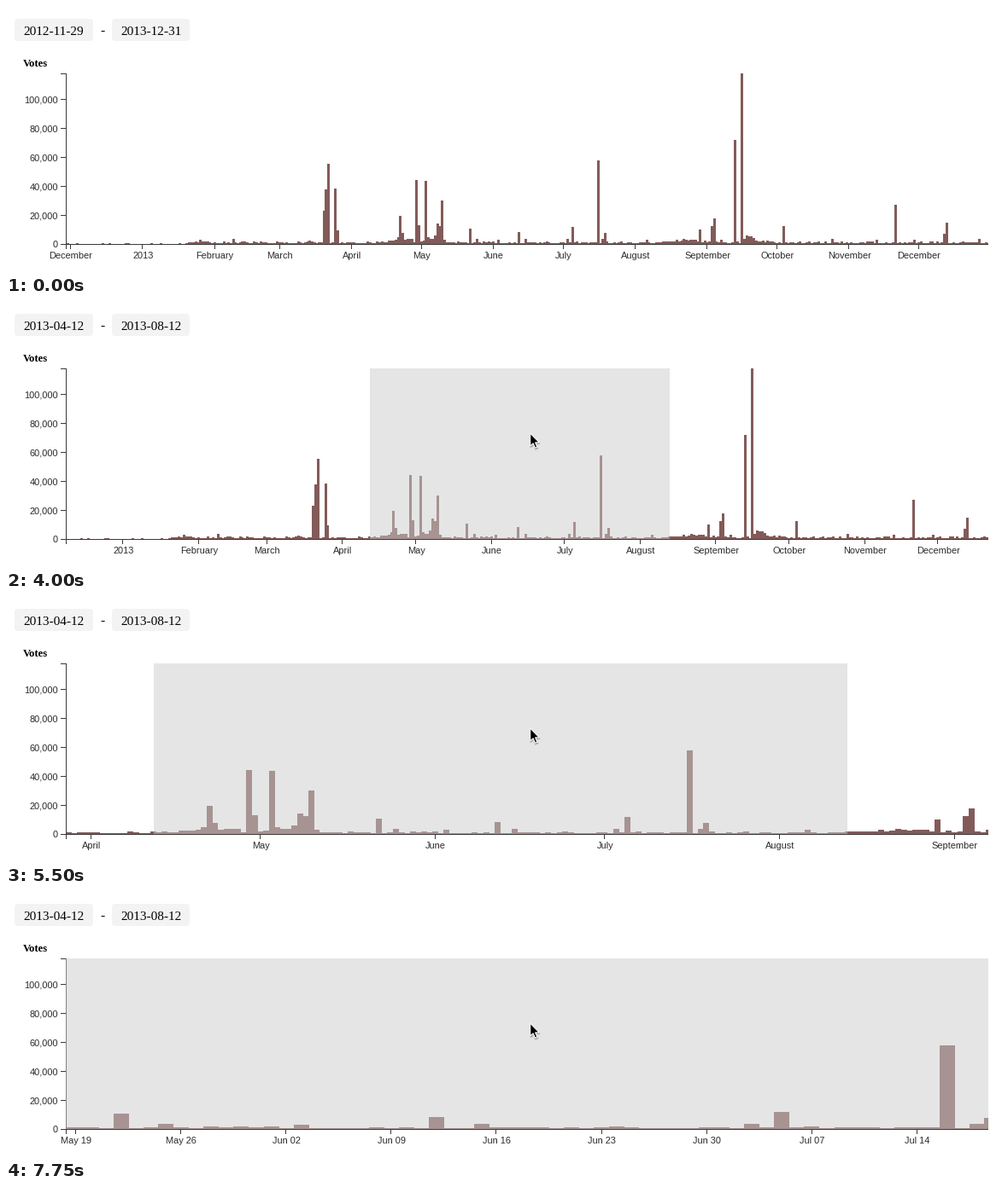
A matplotlib script for the animation above (8000 ms loop, 1166x313 px).

```python
import numpy as np
import matplotlib.pyplot as plt
from matplotlib.animation import FuncAnimation
from matplotlib.collections import PolyCollection
from matplotlib.patches import FancyBboxPatch, Polygon, Rectangle

W, H, DPI = 1166, 313, 100
FRAMES, INTERVAL = 32, 250
LEFT, RIGHT, TOP, BASE = 70, 1150, 79, 279
DAYS, MAX_VOTES = 397, 118150
DAY_PX = (RIGHT - LEFT) / DAYS
FOCUS_X = 618.2
START = np.datetime64("2012-11-29")
MONTHS = ("January February March April May June July August "
          "September October November December").split()
BAR, INK, LABEL = "#825b59", "#3a3a3a", "#2b2b2b"

# The tallest days, in thousands of votes
PEAKS = {
    111: 23, 112: 38, 113: 55.5, 116: 38.5, 117: 9.6, 144: 19.5, 151: 44.5,
    152: 13, 155: 44, 160: 14, 161: 12.5, 162: 30, 174: 10.9, 195: 8.1,
    218: 11.9, 229: 57.9, 232: 7.6, 273: 10, 278: 12.4, 279: 18, 288: 72,
    291: 118.15, 309: 12.5, 357: 27.2, 378: 7.1, 379: 14.8,
}
# Busy spells: middle day, spread in days, extra votes
SPELLS = [(57, 4, 900), (105, 1, 1400), (145, 4, 4500), (157, 3, 3500),
          (267, 10, 1900), (294, 2, 4500), (300, 4, 1000)]


def make_votes():
    rng = np.random.default_rng(7)
    day = np.arange(DAYS + 1)
    votes = 500 + 1200 * rng.random(DAYS + 1) ** 1.4
    votes[rng.random(DAYS + 1) < 0.05] += 2200
    votes[day < 53] *= 0.2
    for middle, spread, extra in SPELLS:
        bump = np.exp(-((day - middle) / spread) ** 2)
        votes += extra * bump * rng.uniform(0.5, 1.4, DAYS + 1)
    for d, thousands in PEAKS.items():
        votes[d] = thousands * 1000
    return votes


def y_of(votes):
    return BASE - (BASE - TOP) * votes / MAX_VOTES


def x_of(day, scale):
    return FOCUS_X + scale * (LEFT + day * DAY_PX - FOCUS_X)


def day_of(px):
    return (px - LEFT) / DAY_PX


def box(x, y, w, h, color, z, **kw):
    return ax.add_patch(Rectangle((x, y), w, h, fc=color, lw=0, zorder=z,
                                  antialiased=False, **kw))


def write(x, y, text, px, ha="left", family="Liberation Sans", color=LABEL,
          weight="normal"):
    return ax.text(x, y, text, fontsize=px * 72 / DPI, family=family,
                   color=color, weight=weight, ha=ha, va="baseline", zorder=5)


def iso(day):
    return str(START + int(day))


def tick_label(date):
    year, month, day = date.split("-")
    if day != "01":
        return f"{MONTHS[int(month) - 1][:3]} {day}"
    return year if month == "01" else MONTHS[int(month) - 1]


def time_ticks(scale):
    # Months while the span is wide, Sundays once it is narrow
    weekly = DAYS / scale / 10 < np.sqrt(7 * 30)
    for d in range(DAYS + 1):
        date = iso(d)
        hit = d % 7 == 3 if weekly else date.endswith("-01")
        x = x_of(d, scale)
        if hit and LEFT <= x <= RIGHT:
            yield x, tick_label(date)


def bar_shapes(scale):
    # Whole-pixel bars, each as wide as one day rounded up
    x0 = np.round(x_of(np.arange(DAYS + 1) - 0.5, scale))
    x1 = x0 + np.ceil(DAY_PX * scale)
    base = np.full(DAYS + 1, BASE)
    return np.stack([np.stack([x0, base], 1), np.stack([x0, tops], 1),
                     np.stack([x1, tops], 1), np.stack([x1, base], 1)], 1)


fig = plt.figure(figsize=(W / DPI, H / DPI), dpi=DPI, facecolor="white")
ax = fig.add_axes([0, 0, 1, 1])
ax.set(xlim=(0, W), ylim=(H, 0))
ax.axis("off")

# Date chips and title
for x, w in ((10, 92), (124, 91)):
    ax.add_patch(FancyBboxPatch((x, 15), w, 26, fc="#f3f3f3", lw=0,
                                boxstyle="round,pad=0,rounding_size=4"))
serif = dict(family="Liberation Serif", color="black")
from_text = write(20, 34, "", 15.3, **serif)
to_text = write(134, 34, "", 15.3, **serif)
write(113, 34, "-", 15.3, ha="center", **serif)
write(20, 71, "Votes", 12.6, weight="bold", **serif)

# Axes
box(LEFT, TOP, 1, BASE - TOP, INK, 3)
box(LEFT, BASE, RIGHT - LEFT, 1, INK, 3)
box(LEFT, BASE, 1, 6, INK, 3)
box(LEFT - 6, TOP, 6, 1, INK, 3)
for value in range(0, 100001, 20000):
    y = y_of(value)
    box(LEFT - 6, int(y), 6, 1, INK, 3)
    write(LEFT - 9, y + 4, f"{value:,}", 11, ha="right")
box(RIGHT, TOP, W - RIGHT, H - TOP, "white", 8)

# Bars and selection
plot_area = Rectangle((LEFT, TOP), RIGHT - LEFT, BASE - TOP,
                      transform=ax.transData)
tops = np.round(y_of(make_votes()))
bars = ax.add_collection(PolyCollection([], fc=BAR, lw=0, zorder=2,
                                        snap=False), autolim=False)
bars.set_clip_path(plot_area)
brush = box(0, TOP, 0, BASE - TOP, "#cccccc", 4, alpha=0.5)
brush.set_clip_path(plot_area)

ARROW = np.array([(0, 0), (0, 15), (3.4, 11.8), (5.8, 17.2), (8.2, 16.2),
                  (5.9, 10.9), (10.6, 10.9)])
shadow = ax.add_patch(Polygon(ARROW, fc="black", ec="black", lw=1.4,
                              alpha=0.18, zorder=9))
arrow = ax.add_patch(Polygon(ARROW, fc="black", ec="white", lw=0.8,
                             zorder=10))

APPEAR, PRESS, RELEASE, REST = 3, 6, 12, 14
BRUSH_FROM = 435
ticks = []


def brush_end(frame):
    return np.interp(frame, [PRESS, 8, 10, 11, RELEASE],
                     [BRUSH_FROM, 535, 676, 760, 769])


def cursor_at(frame):
    if frame < PRESS:
        return (486, 100) if frame == APPEAR else (484, 91)
    if frame < RELEASE:
        return brush_end(frame) + 3, 94
    leave = min((frame - RELEASE) / (REST - RELEASE), 1)
    return 765 - 151.3 * leave, 103 + 52 * leave


def zoom_at(frame):
    return np.exp(np.interp(frame, [15, 16, 20, 22, 23, 27, 31],
                            [0, .0488, .601, .8875, 1.019, 1.4544, 1.866]))


def draw(frame):
    scale = zoom_at(frame)
    bars.set_verts(bar_shapes(scale))

    brushing = frame > PRESS
    brush.set_visible(brushing)
    first, last = 0, DAYS
    if brushing:
        first, last = day_of(BRUSH_FROM), day_of(brush_end(frame))
        x0, x1 = x_of(first, scale), x_of(last, scale)
        brush.set_x(x0)
        brush.set_width(x1 - x0)
    from_text.set_text(iso(first))
    to_text.set_text(iso(last))

    while ticks:
        ticks.pop().remove()
    for x, label in time_ticks(scale):
        ticks.append(box(int(x), BASE, 1, 6, INK, 3))
        ticks.append(write(x + 0.5, 296, label, 11, ha="center"))

    x, y = cursor_at(frame)
    arrow.set_xy(ARROW + (x, y))
    shadow.set_xy(ARROW + (x + 0.5, y + 1.5))
    for part in (arrow, shadow):
        part.set_visible(frame >= APPEAR)
    return []


animation = FuncAnimation(fig, draw, frames=FRAMES, interval=INTERVAL,
                          repeat=True, repeat_delay=0, blit=False)
plt.show()
```
